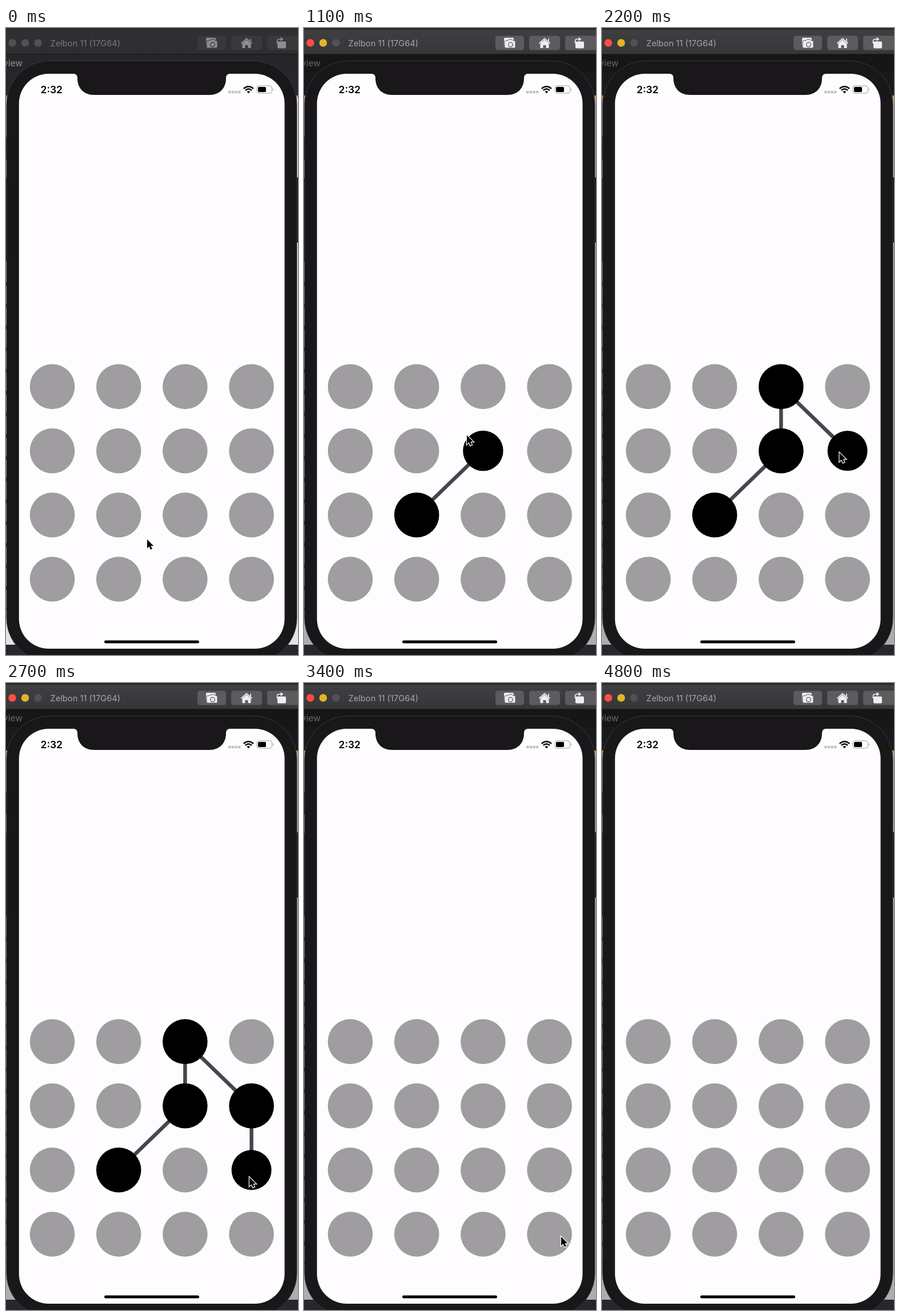
These frames come from a looping animation (511 px wide and 1096 px high, 4.9 s). An HTML page:

```html
<!DOCTYPE html>
<html lang="en">
<head>
<meta charset="utf-8">
<title>Pattern lock</title>
<style>
html, body { margin: 0; width: 100%; height: 100%; overflow: hidden; background: #202226; }
svg {
  display: block; width: 100%; height: 100%;
  font-family: Inter, Roboto, sans-serif;
  --bar1: #303033; --bar2: #2e2e31; --strip: #252628; --under: #24272c; --paper: #e4e4e6;
  --button: #39393b; --icon: #8e8e90; --title: #7b7b7e; --tab: #929295;
  --red: #515154; --yellow: #515154;
}
svg.active {
  --bar1: #403f42; --bar2: #363538; --strip: #161617; --under: #17191c; --paper: #adadaf;
  --button: #5c5b5e; --icon: #eeedef; --title: #a7a6a9; --tab: #69696b;
  --red: #ff4d45; --yellow: #e0b52b;
}
</style>
</head>
<body>
<svg id="stage" viewBox="0 0 511 1096" preserveAspectRatio="none">
  <defs>
    <linearGradient id="bar" x2="0" y2="1">
      <stop style="stop-color:var(--bar1)"/>
      <stop offset="1" style="stop-color:var(--bar2)"/>
    </linearGradient>
  </defs>

  <!-- desktop behind the simulator -->
  <rect y="46" width="511" height="31" fill="var(--strip)"/>
  <rect y="77" width="511" height="41" fill="var(--under)"/>
  <rect y="118" width="511" height="4" fill="#d9902c"/>
  <rect y="122" width="511" height="956" fill="var(--paper)"/>
  <path d="M0 190h3v40h-3zM0 262h3v146h-3zM508 261h3v114h-3z" fill="#161618"/>
  <path d="M0 444V1016" stroke="#29292b" stroke-width="2" stroke-dasharray="7 31"/>
  <rect y="1078" width="511" height="18" fill="#25282d"/>
  <text x="-5" y="66.5" font-size="15.5" fill="var(--tab)">view</text>

  <!-- window bar -->
  <rect width="511" height="46" fill="url(#bar)"/>
  <path d="M0 1.5H511" stroke="#272a30" stroke-width="3"/>
  <path d="M0 46H511" stroke="#101011"/>
  <circle cx="11" cy="26" r="6.8" fill="var(--red)"/>
  <circle cx="33.5" cy="26" r="6.8" fill="var(--yellow)"/>
  <circle cx="56" cy="26" r="6.8" fill="#515154"/>
  <text x="77.5" y="31.5" font-size="14.7" fill="var(--title)">Zelbon 11 (17G64)</text>
  <g fill="var(--button)">
    <rect x="335" y="13.5" width="50" height="25" rx="4.5"/>
    <rect x="394" y="13.5" width="54" height="25" rx="4.5"/>
    <rect x="457" y="13.5" width="60" height="25" rx="4.5"/>
  </g>
  <g fill="var(--icon)">
    <rect x="350" y="17" width="17" height="14" rx="2"/>
    <path d="M353 22h4l1.500-2h6l1.500 2h2q2 0 2 2v9q0 2-2 2h-15q-2 0-2-2v-9q0-2 2-2z" stroke="var(--button)"/>
    <circle cx="361.500" cy="29" r="3.800" fill="none" stroke="var(--button)" stroke-width="1.300"/>
    <path d="M421 20.500l7.500 6.500v8h-5v-5h-5v5h-5v-8z"/>
    <path d="M411.500 27l9.500-8.500 9.500 8.500M428 18.500v5" fill="none" stroke="var(--icon)" stroke-width="1.700"/>
    <rect x="475" y="23.500" width="15" height="12" rx="2"/>
    <path d="M474.500 27v-4q0-3.500 3.500-3.500h3" fill="none" stroke="var(--icon)" stroke-width="1.700"/>
    <path d="M480.500 16l5 3.500-5 3.500z"/>
  </g>

  <!-- phone -->
  <rect x="1" y="57.5" width="508" height="1050" rx="76" fill="#19171a" stroke="#39393b"/>
  <rect x="22.7" y="80" width="464.8" height="1005" rx="52" fill="#fefcff"/>
  <path d="M118 79V80Q125 80 125 88C125 105 136 117 154 117H356C374 117 385 105 385 88Q385 80 392 80V79Z" fill="#19171a"/>
  <text x="60.5" y="113.5" font-size="17.5" font-weight="600">2:32</text>
  <path d="M389 112h21.500" stroke="#c3c2c5" stroke-width="4.500" stroke-dasharray="4.500 1.170"/>
  <g fill="none" stroke="#000" stroke-width="2.400">
    <path d="M415.800 106q8.600-7.600 17.200 0"/>
    <path d="M418.800 109q5.600-4.800 11.200 0"/>
  </g>
  <path d="M424.400 114.300l-3-3q3-2.300 6 0z"/>
  <rect x="439" y="101" width="26.500" height="13" rx="3.800" fill="none" stroke="#9d9ca0"/>
  <rect x="441" y="103" width="14" height="9" rx="2"/>
  <path d="M467 105.500q2 2 0 4z" fill="#8e8d90"/>
  <rect x="172" y="1070.400" width="166" height="5" rx="2.500"/>

  <polyline id="trail" fill="none" stroke="#48464b" stroke-width="6.500" stroke-linejoin="round"/>
  <g id="dots"></g>
  <path id="cursor" d="M0 0V15.500L3.600 12.200 6 17.800 8.800 16.600 6.400 11.200H11.300Z" stroke="#fff" stroke-width="2.400" paint-order="stroke"/>
</svg>
<script>
const LOOP = 4900, STEP = 100, PULSE = 180, RADIUS = 39.3;
const FOCUS = 300, PRESS = 810, RELEASE = 3400;
const byId = id => document.getElementById(id);
const stage = byId('stage'), trail = byId('trail'), cursor = byId('cursor');

const dots = Array.from({ length: 16 }, (_, i) => {
  const node = document.createElementNS('http://www.w3.org/2000/svg', 'circle');
  const x = 81 + 116.2 * (i % 4), y = 626.9 + 112.2 * Math.floor(i / 4);
  node.setAttribute('cx', x);
  node.setAttribute('cy', y);
  byId('dots').append(node);
  return { node, x, y };
});

// Rests of the pointer tip: [arrive, leave, x, y]
const rests = [
  [0, 0, 247, 894], [100, 200, 238, 883], [800, 800, 218, 842], [1100, 1100, 285, 712],
  [1700, 1700, 297, 634], [2300, 2500, 425, 751], [2700, 2700, 426, 864],
  [3100, 3800, 450, 968], [4400, LOOP, 395, -25]
];

function pointer(t) {
  const i = rests.findIndex(r => t <= r[1]);
  const [arrive, , x, y] = rests[i];
  if (t >= arrive) return [x, y];
  const [, leave, x0, y0] = rests[i - 1];
  const p = (t - leave) / (arrive - leave), k = p * p * (3 - 2 * p);
  return [x0 + (x - x0) * k, y0 + (y - y0) * k];
}

// A dot is hit when the pressed pointer first enters it
const hits = new Map();
for (let t = PRESS; t < RELEASE; t += 5) {
  const [px, py] = pointer(t);
  for (const dot of dots) {
    if (!hits.has(dot) && Math.hypot(px - dot.x, py - dot.y) < RADIUS) hits.set(dot, t);
  }
}

function draw(now) {
  const t = Math.floor(now % LOOP / STEP) * STEP;
  const isHit = dot => t < RELEASE && hits.get(dot) <= t;
  stage.classList.toggle('active', t >= FOCUS);

  for (const dot of dots) {
    const p = isHit(dot) ? Math.min(1, (t - hits.get(dot)) / PULSE) : 1;
    dot.node.setAttribute('r', RADIUS * (1 - 0.11 * Math.sin(Math.PI * p)));
    dot.node.setAttribute('fill', isHit(dot) ? '#000' : '#9f9da0');
  }
  trail.setAttribute('points', [...hits.keys()].filter(isHit).map(d => `${d.x},${d.y}`).join(' '));
  cursor.setAttribute('transform', `translate(${pointer(t)})`);
}

const start = performance.now();
function tick() {
  draw(performance.now() - start);
  requestAnimationFrame(tick);
}
tick();
</script>
</body>
</html>
```
